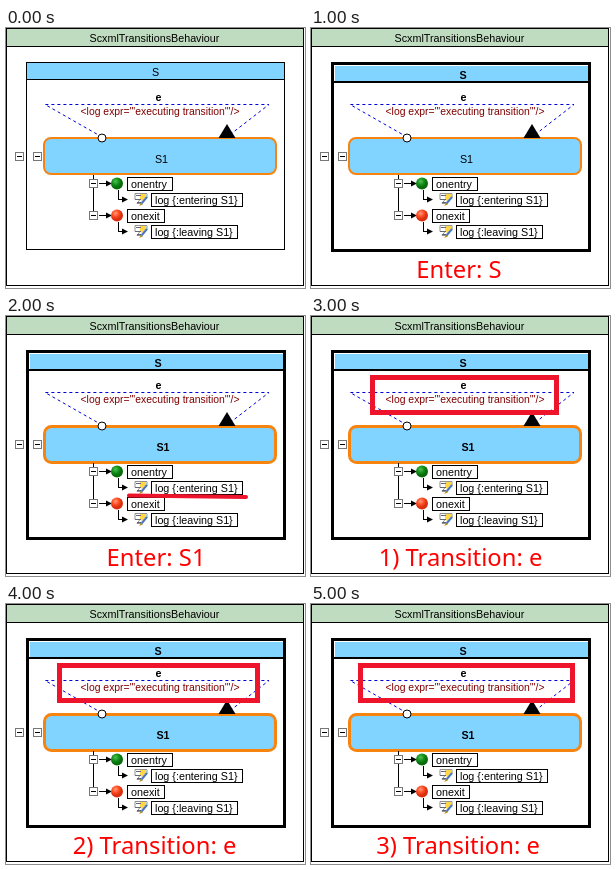
Recreate the animation shown at these times as an HTML page. Size 299 by 260 pixels, loop 6 s.

```html
<!DOCTYPE html>
<html lang="en">
<head>
<meta charset="utf-8">
<title>State chart run</title>
<style>
  html, body { margin: 0; width: 100%; height: 100%; overflow: hidden; background: #fff; }
  svg { display: block; width: 299px; height: 260px; }
  text { font: 10.75px "Liberation Sans", Arial, sans-serif; text-anchor: middle; white-space: pre; }
  .left { text-anchor: start; }
  .bold { font-weight: bold; }
  .line { fill: none; stroke: #000; }
  .box { fill: #fff; stroke: #000; }
  .blue { fill: #80d4ff; }
  .mark { fill: none; stroke: #ed142c; }
  #expression { font-size: 10.4px; fill: #800000; }
  #caption { font: 23.8px "Noto Sans", sans-serif; fill: #f00; }
</style>
</head>
<body>
<svg viewBox="0 0 299 260">
  <defs>
    <radialGradient id="green" cx=".38" cy=".32"><stop stop-color="#55bd55"/><stop offset=".6" stop-color="#109018"/><stop offset="1" stop-color="#086c0c"/></radialGradient>
    <radialGradient id="red" cx=".38" cy=".32"><stop stop-color="#ff9a78"/><stop offset=".6" stop-color="#ff4a20"/><stop offset="1" stop-color="#d83010"/></radialGradient>
    <g id="minus" shape-rendering="crispEdges">
      <rect x=".5" y=".5" width="8" height="8" fill="#fff" stroke="#777"/>
      <path class="line" d="M2 4.5h5"/>
    </g>
    <g id="branch">
      <path class="line" d="M10 6.5h8M29.5 13v9.500h5" shape-rendering="crispEdges"/>
      <path d="M17 3.500l6 3l-6 3zM33 19.500l6 3l-6 3z"/>
      <g transform="translate(45 16)">
        <path d="M1 .5h12v4l-5 6h-5l3-4h-5z" fill="#fff" stroke="#777" stroke-width=".8"/>
        <path d="M6 1h6v3l-4 4l-2-2z" fill="#ffd84a"/>
        <path d="M2 2.500h5M1 6.500h6M3 9.500h4" stroke="#667"/>
        <path d="M13 4l-6 7" stroke="#4a78c0" stroke-width="2"/>
        <path d="M7 10l2 1.500l-4 1.500z" fill="#c89020"/>
      </g>
    </g>
  </defs>

  <rect width="299" height="260" fill="#fff"/>
  <rect x="1" y="1" width="296" height="17" fill="#c0dcc0"/>
  <path class="line" d="M.5 .5h297v257h-297zM0 18.500h298" shape-rendering="crispEdges"/>
  <text x="148.500" y="14">ScxmlTransitionsBehaviour</text>

  <g id="outerIdle">
    <rect class="blue" x="21" y="35" width="258" height="17"/>
    <path class="line" d="M20.500 34.500h258v187h-258zM20 51.500h258" shape-rendering="crispEdges"/>
    <text x="149.500" y="48">S</text>
  </g>
  <g id="outerActive">
    <rect class="blue" x="24" y="38" width="253" height="15"/>
    <path class="line" stroke-width="3" d="M21.500 35.500h257v187h-257z" shape-rendering="crispEdges"/>
    <path class="line" stroke-width="2" d="M21 54h257" shape-rendering="crispEdges"/>
    <text class="bold" x="152" y="51">S</text>
  </g>

  <path fill="none" stroke="#00d" stroke-dasharray="3 3" d="M96 109L39 76.500H263L221 109"/>
  <text class="bold" x="152.500" y="73">e</text>
  <text id="expression" x="154" y="87">&lt;log expr="'executing transition'"/&gt;</text>

  <rect id="inner" class="blue" rx="7" stroke="#f88410"/>
  <text id="innerName">S1</text>
  <circle class="box" cx="96" cy="110" r="4"/>
  <path d="M212.500 110L221 96L229.500 110z"/>

  <use href="#minus" x="9" y="124"/>
  <use href="#minus" x="27" y="124"/>
  <path class="line" d="M87.500 147v37" shape-rendering="crispEdges"/>
  <g transform="translate(83 149)">
    <use href="#branch"/>
    <use href="#minus" y="2"/>
    <circle cx="28" cy="6.500" r="6" fill="url(#green)"/>
    <rect class="box" x="38.500" y=".5" width="45" height="13"/>
    <text class="left" x="42" y="11">onentry</text>
    <rect class="box" x="62.500" y="16.500" width="91" height="13"/>
    <text class="left" x="66" y="27">log {:entering S1}</text>
  </g>
  <g transform="translate(83 181)">
    <use href="#branch"/>
    <use href="#minus" y="2"/>
    <circle cx="28" cy="6.500" r="6" fill="url(#red)"/>
    <rect class="box" x="38.500" y=".5" width="37" height="13"/>
    <text class="left" x="42" y="11">onexit</text>
    <rect class="box" x="62.500" y="16.500" width="86" height="13"/>
    <text class="left" x="66" y="27">log {:leaving S1}</text>
  </g>

  <path id="underline" class="mark" stroke-width="4" stroke-linecap="round" d="M123 179.500L240 181"/>
  <rect id="frame" class="mark" stroke-width="5" y="61.500" height="35"/>
  <text id="caption" y="249.500"></text>
</svg>
<script>
  const STEP = 1000;
  const steps = [
    { caption: "", center: 148 },
    { caption: "Enter: S", center: 148 },
    { caption: "Enter: S1", center: 150 },
    { caption: "1) Transition: e", center: 149.5, frame: [59, 248] },
    { caption: "2) Transition: e", center: 148.5, frame: [51, 254] },
    { caption: "3) Transition: e", center: 147, frame: [47, 264] }
  ];
  const idleInner = {
    box: { x: 38, y: 110, width: 232, height: 36, "stroke-width": 2 },
    name: { x: 155.5, y: 134.5, class: "" }
  };
  const activeInner = {
    box: { x: 38.5, y: 110.5, width: 231, height: 36, "stroke-width": 3 },
    name: { x: 157, y: 135, class: "bold" }
  };
  const get = id => document.getElementById(id);
  const show = (id, visible) => get(id).style.display = visible ? "" : "none";
  const set = (id, attributes) => {
    for (const name in attributes) get(id).setAttribute(name, attributes[name]);
  };
  let current = -1;

  function draw(index) {
    const { caption, center, frame } = steps[index];
    const inner = index >= 2 ? activeInner : idleInner;
    show("outerIdle", index === 0);
    show("outerActive", index > 0);
    show("underline", index === 2);
    show("frame", frame);
    set("inner", inner.box);
    set("innerName", inner.name);
    if (frame) set("frame", { x: frame[0] + 2.5, width: frame[1] - frame[0] - 5 });
    set("caption", { x: center });
    get("caption").textContent = caption;
  }

  function tick() {
    const index = Math.floor(performance.now() / STEP) % steps.length;
    if (index !== current) draw(current = index);
    requestAnimationFrame(tick);
  }
  tick();
</script>
</body>
</html>
```
